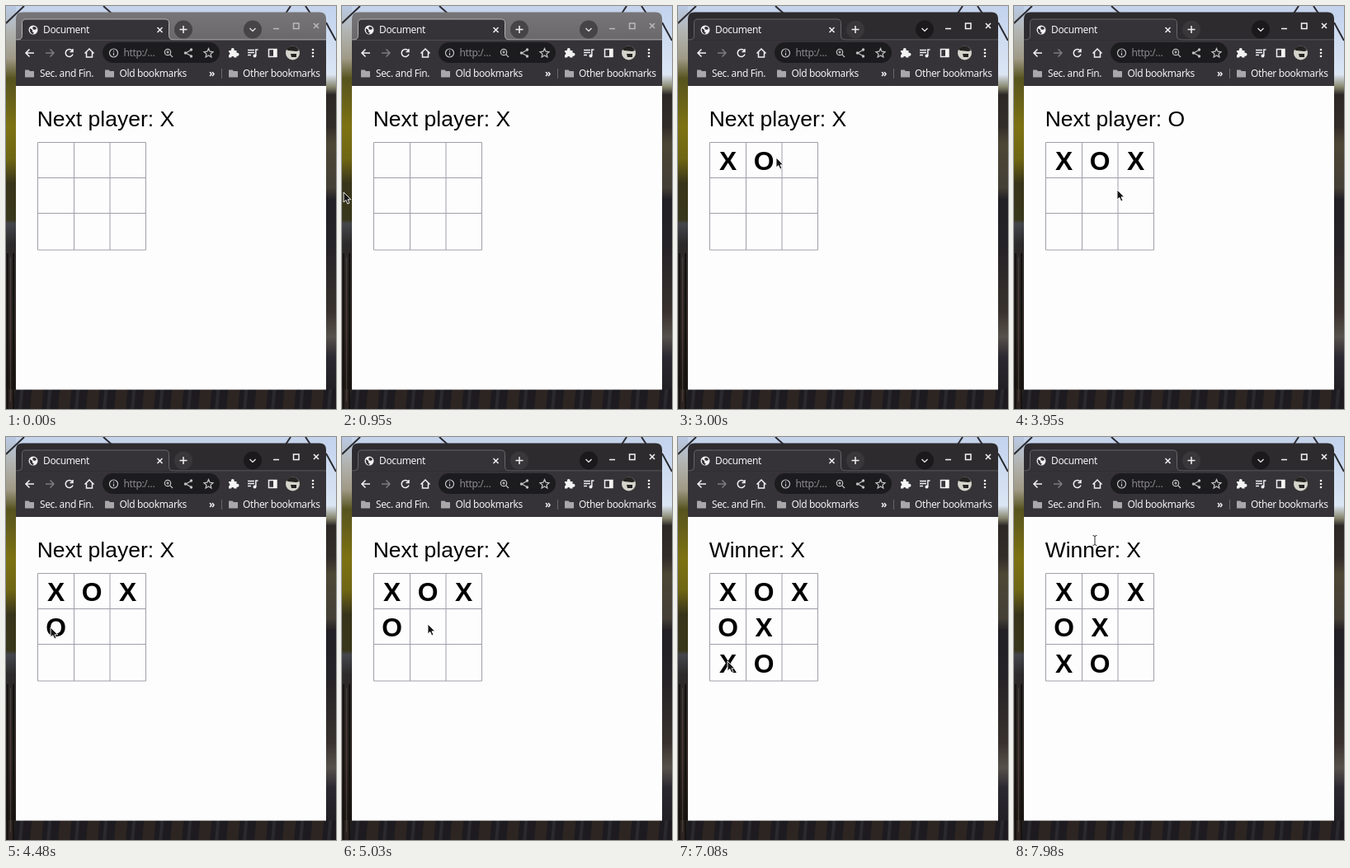
An HTML page for the animation above (8 s loop, 400x489 px).

```html
<!DOCTYPE html>
<html lang="en">
<head>
<meta charset="utf-8">
<title>Tic-tac-toe</title>
<style>
  html, body { margin: 0; width: 100%; height: 100%; overflow: hidden; }
  svg { display: block; }
  .ui { font: 12px "Noto Sans", sans-serif; letter-spacing: -.38px; fill: #f2f2f3; }
  .page { font: 26.5px "Liberation Sans", Arial, sans-serif; }
  .marks { font: bold 31.8px "Liberation Sans", Arial, sans-serif; text-anchor: middle; }
  .line { fill: none; stroke: #f0f0f1; stroke-width: 1.5; }
  .dim { stroke: #c4c3c6; stroke-width: 1.2; }
  #bar { fill: #2d2b2e; }
  #tab { fill: #353337; stroke: #68666a; }
  #controls { stroke: #f4f4f4; }
  .inactive #bar { fill: url(#inactiveBar); }
  .inactive #tab { stroke: #b5b3b5; }
  .inactive #controls { stroke: #bbb9bb; }
  .inactive .round { fill: #464447; }
</style>
</head>
<body>
<svg id="stage" width="400" height="489" viewBox="0 0 400 489">
  <defs>
    <linearGradient id="leftScene" x2="0" y2="1">
      <stop offset="0" stop-color="#b9c9e4"/>
      <stop offset=".06" stop-color="#b3b5b4"/>
      <stop offset=".13" stop-color="#a09a86"/>
      <stop offset=".18" stop-color="#57531f"/>
      <stop offset=".3" stop-color="#7d7212"/>
      <stop offset=".38" stop-color="#6f6614"/>
      <stop offset=".44" stop-color="#38341a"/>
      <stop offset=".53" stop-color="#39371b"/>
      <stop offset=".54" stop-color="#45474d"/>
      <stop offset=".59" stop-color="#2c2a2a"/>
      <stop offset=".8" stop-color="#2d2521"/>
      <stop offset="1" stop-color="#17130f"/>
    </linearGradient>
    <linearGradient id="rightScene" x2="0" y2="1">
      <stop offset="0" stop-color="#c3d3ee"/>
      <stop offset=".17" stop-color="#dbe5f3"/>
      <stop offset=".2" stop-color="#8a8a72"/>
      <stop offset=".22" stop-color="#2d2826"/>
      <stop offset=".3" stop-color="#332d29"/>
      <stop offset=".34" stop-color="#4b4634"/>
      <stop offset=".45" stop-color="#454036"/>
      <stop offset=".48" stop-color="#222025"/>
      <stop offset=".6" stop-color="#262327"/>
      <stop offset=".76" stop-color="#39322e"/>
      <stop offset=".82" stop-color="#57514c"/>
      <stop offset=".87" stop-color="#2c2a31"/>
      <stop offset="1" stop-color="#1b191d"/>
    </linearGradient>
    <linearGradient id="inactiveBar" x2="0" y2="1">
      <stop offset="0" stop-color="#777577"/>
      <stop offset="1" stop-color="#696769"/>
    </linearGradient>
    <pattern id="fence" width="34" height="30" patternUnits="userSpaceOnUse" patternTransform="skewX(-5)">
      <path fill="#1d1b1f" d="M0 0H34V30H0Z"/>
      <path fill="#2d2522" d="M4 0H18V30H4Z"/>
      <path fill="#2a292f" d="M24 0H28V30H24Z"/>
    </pattern>
    <path id="folder" fill="#a9a7aa" d="M-5-4.500H-1L.5-3H5Q5.500-3 5.500-2.500V4Q5.500 4.500 5 4.500H-5Q-5.500 4.500-5.500 4V-4Q-5.500-4.500-5-4.500Z"/>
    <path id="cross" d="M-3-3L3 3M3-3L-3 3"/>
  </defs>

  <!-- Desktop -->
  <path fill="#c5d3eb" d="M0 0H400V20H0Z"/>
  <path fill="url(#leftScene)" d="M0 0H12V489H0Z"/>
  <path fill="url(#rightScene)" d="M388 0H400V489H388Z"/>
  <path fill="url(#fence)" d="M0 465H400V489H0Z"/>
  <path stroke="#15120f" stroke-width="2" d="M2 300V489M9 300V489"/>
  <path stroke="#4a3f37" d="M5.500 305V480"/>
  <path stroke="#2a2b30" stroke-width="2" d="M0 21L22 0M118 0L128 9M339 9L345 0M363 0L369 9M388 20L400 42"/>

  <!-- Browser window -->
  <path fill="#fefdfe" d="M12 90H388V465.500H12Z"/>
  <path id="bar" d="M12 44V15.500Q12 7.500 20 7.500H380Q388 7.500 388 15.500V44Z"/>
  <path id="tab" d="M12 41H14Q19.500 41 19.500 35.500V20.500Q19.500 16 24 16H193Q197.500 16 197.500 20.500V35.500Q197.500 41 203 41H388"/>
  <path fill="#353337" d="M12 41.500H388V97H12Z"/>

  <g class="ui">
    <circle cx="33" cy="29" r="5.500"/>
    <path fill="#353337" d="M29 27L32 29V31L34 33L32 34Q28 32 29 27ZM33 25L36 25.500L37 28L34 29L32 27Z"/>
    <text x="45" y="33">Document</text>
    <text x="41" y="86">Sec. and Fin.</text>
    <text x="137.500" y="86">Old bookmarks</text>
    <text x="246" y="86" font-weight="bold">»</text>
    <text x="287" y="86">Other bookmarks</text>
  </g>
  <use href="#folder" x="28.500" y="82"/>
  <use href="#folder" x="125.500" y="82"/>
  <use href="#folder" x="275.500" y="82"/>
  <path stroke="#68666a" d="M261.500 76V88"/>

  <g class="line">
    <use href="#cross" x="186.500" y="29"/>
    <circle class="round" cx="215" cy="28.500" r="11" fill="#39373a" stroke="none"/>
    <path d="M210.500 28.500H219.500M215 24V33"/>
    <circle class="round" cx="299" cy="28.500" r="11" fill="#1b191c" stroke="none"/>
    <path d="M295.500 27L299 30.500L302.500 27" stroke-width="1.2"/>
    <g id="controls">
      <path d="M324 27.500H331M348.500 21H355V27.500H348.500Z"/>
      <use href="#cross" x="376" y="24"/>
    </g>
    <path d="M34 57H24M28.500 52.500L24 57L28.500 61.500"/>
    <path stroke="#7d7b7f" d="M48 57H58M53.500 52.500L58 57L53.500 61.500"/>
    <path d="M80.500 54.500A4.500 4.500 0 1 0 81 58.500M81 52V55.500H77.500"/>
    <path d="M95.500 57.500L101 52L106.500 57.500M97.500 56V62H104.500V56"/>
  </g>

  <rect x="117" y="44" width="142" height="25" rx="12.500" fill="#1c1b1e"/>
  <g class="line dim">
    <circle cx="130.500" cy="57" r="5"/>
    <path d="M130.500 54V55.300M130.500 56.500V60"/>
    <circle cx="196" cy="56" r="3.700"/>
    <path d="M198.800 58.800L202 62M194.300 56H197.700M196 54.300V57.700"/>
    <path d="M224 53.500L218 57L224 60.500"/>
    <path d="M245.500 51.500L247.100 55.200L251 55.600L248 58.200L248.900 62L245.500 60L242.100 62L243 58.200L240 55.600L243.900 55.200Z"/>
    <g fill="#c4c3c6" stroke="none">
      <circle cx="224.500" cy="53" r="1.700"/><circle cx="217.500" cy="57" r="1.700"/><circle cx="224.500" cy="61" r="1.700"/>
    </g>
  </g>
  <text class="ui" x="142.500" y="61" style="fill:#8d8b8f">http:/…</text>

  <g fill="#f4f4f4">
    <path d="M270 54H273A2 2 0 1 1 276.500 54H279.500V57A2 2 0 1 1 279.500 60.500V62.500H276.500A1.800 1.800 0 0 0 273 62.500H270V59.500A1.800 1.800 0 0 0 270 56Z"/>
    <path class="line" d="M293 53.500H301M293 56.500H301M293 59.500H297M302.800 60V53H305.500"/>
    <circle cx="301.500" cy="60.500" r="2"/>
    <path class="line" d="M318.500 52.500H328V61.500H318.500Z"/>
    <path d="M324 52H328V62H324Z"/>
    <circle cx="347.500" cy="57" r="8.500" fill="#d4d4cb"/>
    <path fill="#242321" d="M340 53Q342 48.500 347.500 48.500T355 54L352 55L342 54ZM345 58H352V62H346Z"/>
    <circle cx="372" cy="53" r="1.300"/><circle cx="372" cy="57" r="1.300"/><circle cx="372" cy="61" r="1.300"/>
  </g>

  <!-- Game -->
  <text id="status" class="page" x="37.700" y="146"></text>
  <path fill="none" stroke="#a09ea8" d="M38.500 165.500H169.500V296H38.500ZM82.500 165V296M126 165V296M38 208.500H170M38 251.500H170"/>
  <g id="marks" class="marks"></g>

  <g id="pointer">
    <path id="arrow" fill="#161516" stroke="#fff" stroke-width=".9" d="M0 0V12L2.800 9.500L4.800 14L7 13L5 8.800H8.800Z"/>
    <path id="beam" fill="none" stroke="#333" d="M-2.500-5.500Q0-5.500 0-4Q0-5.500 2.500-5.500M0-4.500V5.500M-2.500 6.500Q0 6.500 0 5Q0 6.500 2.500 6.500"/>
  </g>
</svg>
<script>
const LOOP = 8000, FOCUS_AT = 1690;
// [time, cell]
const moves = [[1760, 0], [2640, 1], [3480, 2], [4360, 3], [5340, 4], [6420, 7], [6950, 6]];
// [time, x, y]
const path = [
  [850, -12, 236], [950, 2, 226], [1680, 63, 186], [2050, 63, 186],
  [2470, 100, 183], [2800, 100, 183], [3250, 146, 186], [3650, 146, 186],
  [3950, 125, 223], [4180, 54, 231], [4500, 54, 231], [4980, 104, 227],
  [5450, 104, 227], [5800, 57, 273], [5920, 57, 273], [6130, 92, 265],
  [6180, 97, 265], [6480, 97, 265], [6730, 60, 272], [7630, 60, 272],
  [7800, 102, 195], [7960, 98, 125]
];
const $ = id => document.getElementById(id);
const show = (el, on) => el.setAttribute('visibility', on ? 'visible' : 'hidden');

const marks = moves.map(([, cell], i) => {
  const text = document.createElementNS('http://www.w3.org/2000/svg', 'text');
  text.setAttribute('x', 60.5 + cell % 3 * 43.5);
  text.setAttribute('y', 199 + Math.floor(cell / 3) * 43.3);
  text.textContent = 'XO'[i % 2];
  return $('marks').appendChild(text);
});

function pointerAt(t) {
  const next = path.findIndex(key => key[0] > t);
  if (next === 0) return path[0].slice(1);
  if (next < 0) return path[path.length - 1].slice(1);
  const [t0, x0, y0] = path[next - 1], [t1, x1, y1] = path[next];
  const u = (t - t0) / (t1 - t0), ease = u * u * (3 - 2 * u);
  return [x0 + (x1 - x0) * ease, y0 + (y1 - y0) * ease];
}

function draw(t) {
  const played = moves.filter(move => move[0] <= t).length;
  marks.forEach((mark, i) => show(mark, i < played));
  $('status').textContent = played === moves.length ? 'Winner: X' : 'Next player: ' + 'XO'[played % 2];
  $('stage').classList.toggle('inactive', t < FOCUS_AT);

  const [x, y] = pointerAt(t), overText = y < 152;
  $('pointer').setAttribute('transform', `translate(${Math.round(x)} ${Math.round(y)})`);
  show($('arrow'), !overText);
  show($('beam'), overText);
}

const start = performance.now();
function tick() {
  draw((performance.now() - start) % LOOP);
  requestAnimationFrame(tick);
}
tick();
</script>
</body>
</html>
```
